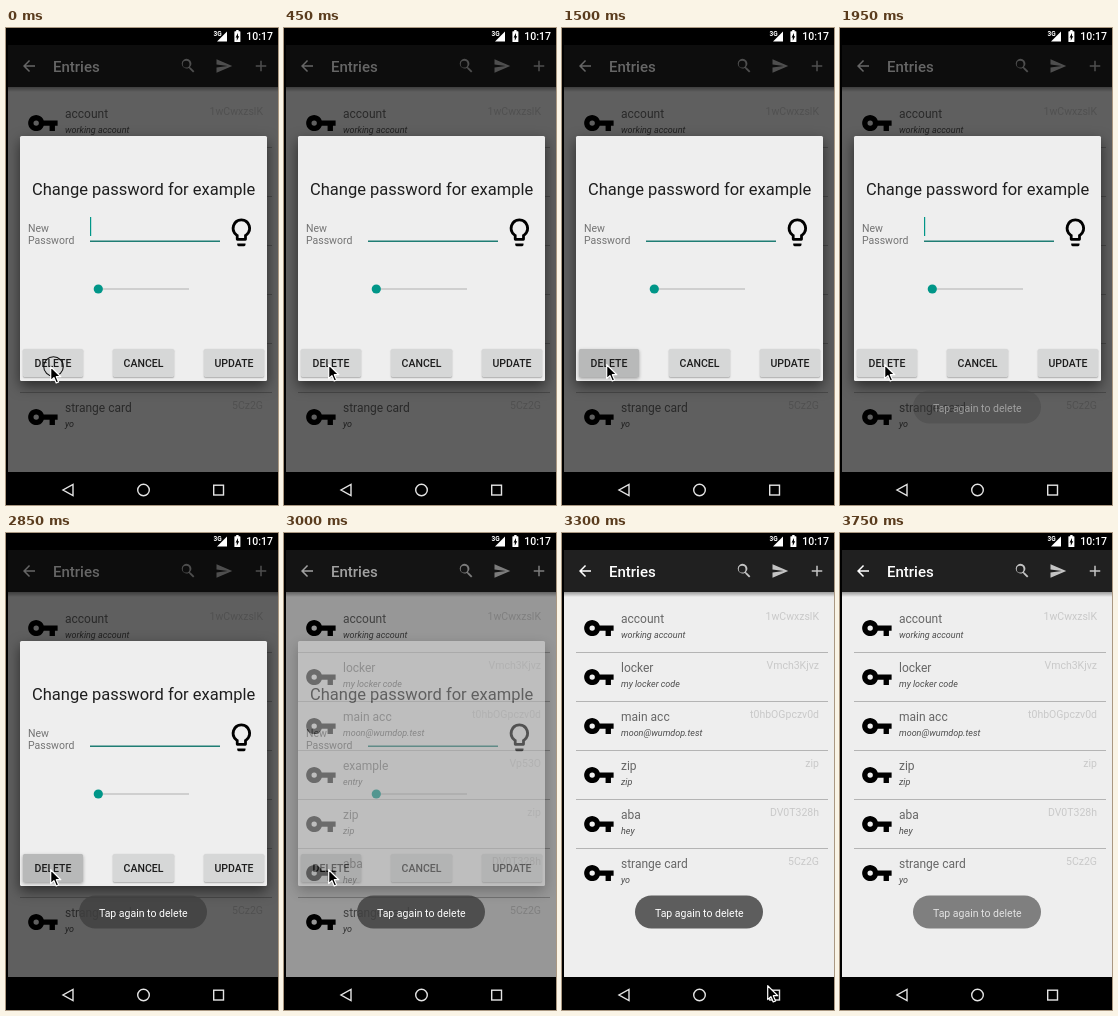
These frames come from a looping animation (272 px wide and 477 px high, 3960 ms). An HTML page with a canvas:

```html
<!DOCTYPE html>
<html lang="en">
<head>
<meta charset="utf-8">
<title>Password entries</title>
<style>
html, body { margin: 0; width: 100%; height: 100%; overflow: hidden; background: #000; }
canvas { display: block; width: 100vw; height: 100vh; }
</style>
</head>
<body>
<canvas id="stage"></canvas>
<script>
const W = 272, H = 477, LOOP = 3960;
const ratio = window.devicePixelRatio || 1;
const stage = document.getElementById('stage');
const layer = document.createElement('canvas');
for (const c of [stage, layer]) {
  c.width = W * ratio;
  c.height = H * ratio;
}
const screen = stage.getContext('2d');
const sheet = layer.getContext('2d');
for (const c of [screen, sheet]) c.scale(ratio, ratio);
let g = screen;

const TEAL = '#009688';
const ICONS = {
  back: 'M20 11H7.83l5.59-5.59L12 4l-8 8 8 8 1.41-1.41L7.83 13H20v-2z',
  search: 'M15.5 14h-.79l-.28-.27A6.5 6.5 0 1 0 13 14.7l.73.28v.79l5 4.99L20.49 19zM9.5 14a4.5 4.5 0 1 1 0-9 4.5 4.5 0 0 1 0 9z',
  send: 'M2.01 21L23 12 2.01 3 2 10l15 2-15 2z',
  add: 'M19 13h-6v6h-2v-6H5v-2h6V5h2v6h6v2z',
  key: 'M12.65 10A6 6 0 1 0 12.65 14H17v4h4v-4h2v-4zM7 14a2 2 0 1 1 0-4 2 2 0 0 1 0 4z',
  bulb: 'M9 21a1 1 0 0 0 1 1h4a1 1 0 0 0 1-1v-1H9zM12 2A7 7 0 0 0 8 14.74V17a1 1 0 0 0 1 1h6a1 1 0 0 0 1-1v-2.26A7 7 0 0 0 12 2zM14.85 13.1l-.85.6V16h-4v-2.3l-.85-.6A5 5 0 1 1 14.85 13.1z',
  battery: 'M16 4H14V2h-4v2H8a1 1 0 0 0-1 1v16a1 1 0 0 0 1 1h8a1 1 0 0 0 1-1V5a1 1 0 0 0-1-1zM11 20v-5.5H9L13 7v5.5h2z',
  pointer: 'M.7.7V14.6L3.9 11.6 6.2 17 8.6 16 6.3 10.7H10.8z'
};
for (const name in ICONS) ICONS[name] = new Path2D(ICONS[name]);

const ENTRIES = [
  ['account', 'working account', '1wCwxzslK'],
  ['locker', 'my locker code', 'Vmch3Kjvz'],
  ['main acc', 'moon@wumdop.test', 't0hbOGpczv0d'],
  ['example', 'entry', 'Vp53O'],
  ['zip', 'zip', 'zip'],
  ['aba', 'hey', 'DV0T328h'],
  ['strange card', 'yo', '5Cz2G']
];

// Stepped tracks: [start time, value]
const TRACKS = {
  caret: [[0, 1], [150, 0], [750, 1], [1200, 0], [1950, 1], [2400, 0]],
  ring: [[0, 1], [150, 0], [1200, 1], [1350, 0], [2400, 1], [2550, 0]],
  press: [[0, 0], [1350, .7], [1500, 1], [1650, 0], [2850, 1], [3000, .5]],
  toast: [[0, 0], [1800, .2], [1950, .45], [2100, .75], [2250, 1], [3750, .77]],
  dialog: [[0, 1], [3000, .45], [3150, .04], [3300, 0]],
  dim: [[0, .6], [3000, .37], [3150, .22], [3300, 0]],
  pointer: [[0, [44, 338]], [450, [44, 336]], [3300, [205, 452]], [3450, null]],
  removed: [[0, 0], [3300, 1]]
};

function stateAt(t) {
  const s = {};
  for (const name in TRACKS) {
    s[name] = TRACKS[name].filter(k => k[0] <= t).pop()[1];
  }
  return s;
}

function rect(x, y, w, h, fill) {
  g.fillStyle = fill;
  g.fillRect(x, y, w, h);
}

function pill(x, y, w, h, r, fill) {
  g.fillStyle = fill;
  g.beginPath();
  g.roundRect(x, y, w, h, r);
  g.fill();
}

function shadow(color, blur, dy) {
  g.shadowColor = color;
  g.shadowBlur = blur * ratio;
  g.shadowOffsetY = dy * ratio;
}

function text(str, x, y, size, fill, style = '', align = 'left') {
  g.font = `${style} ${size}px Roboto, sans-serif`;
  g.textAlign = align;
  g.fillStyle = fill;
  g.fillText(str, x, y);
}

function icon(name, x, y, scale, fill) {
  g.save();
  g.translate(x, y);
  g.scale(scale, scale);
  g.fillStyle = fill;
  g.fill(ICONS[name], 'evenodd');
  g.restore();
}

function circle(x, y, r) {
  g.beginPath();
  g.arc(x, y, r, 0, Math.PI * 2);
}

function drawList(removed) {
  rect(2, 17, 270, 427, '#eee');
  const rows = ENTRIES.filter(e => !removed || e[0] !== 'example');
  rows.forEach(([name, note, code], i) => {
    const y = 71 + i * 49;
    icon('key', 20.8, y + 8, 1.34, '#000');
    text(name, 59, y + 19, 12, '#666');
    text(note, 59, y + 34, 9, '#4c4c4c', 'italic');
    text(code, 257, y + 16, 10.5, '#c9c9c9', '', 'right');
    if (i < rows.length - 1) rect(14, y + 48, 252, 1, '#b4b4b4');
  });

  const fade = g.createLinearGradient(0, 59, 0, 64);
  fade.addColorStop(0, 'rgba(0,0,0,.35)');
  fade.addColorStop(1, 'rgba(0,0,0,0)');
  rect(2, 59, 270, 5, fade);
  rect(2, 17, 270, 42, '#202020');
  icon('back', 14, 29, .75, '#fff');
  text('Entries', 47, 44, 15, '#fff', '500');
  icon('search', 173, 29, .75, '#c4c4c4');
  icon('send', 209, 29, .75, '#c4c4c4');
  icon('add', 246, 29, .75, '#c4c4c4');
}

function drawBars() {
  rect(0, 0, W, 17, '#000');
  rect(0, 444, W, 33, '#000');
  rect(0, 0, 2, H, '#000');
  text('3G', 207.5, 7.5, 6.5, '#fff', '700');
  g.fillStyle = '#fff';
  g.beginPath();
  g.moveTo(211, 13.5);
  g.lineTo(221, 13.5);
  g.lineTo(221, 3.5);
  g.fill();
  icon('battery', 224.2, .8, .6, '#fff');
  text('10:17', 267, 12, 10.5, '#fff', '500', 'right');

  g.strokeStyle = '#e4e4e4';
  g.lineWidth = 1.4;
  g.beginPath();
  g.moveTo(67, 456.5);
  g.lineTo(67, 467.5);
  g.lineTo(57, 462);
  g.closePath();
  g.stroke();
  circle(137.5, 462, 5.8);
  g.stroke();
  g.strokeRect(207.7, 457.2, 9.8, 9.8);
}

function drawButton(label, x, w, press) {
  const tone = Math.round(214 - press * 30);
  g.save();
  shadow('rgba(0,0,0,.35)', 1.5 + press * 2, .8 + press * .7);
  pill(x, 321, w, 28, 1.5, `rgb(${tone},${tone + 1},${tone + 1})`);
  g.restore();
  text(label, x + w / 2, 339, 10.5, '#1c1c1c', '500', 'center');
}

function drawDialog(s) {
  g.save();
  shadow('rgba(0,0,0,.55)', 13, 5);
  pill(14, 108, 247, 245, 1.5, '#eee');
  g.restore();
  text('Change password for example', 26, 167, 16.5, '#1e1e1e');
  text('New', 22, 204, 10.5, '#747474');
  text('Password', 22, 216, 10.5, '#747474');
  rect(84, 212.5, 130, 1.5, '#1f7d74');
  if (s.caret) rect(84, 189, 1.2, 19, TEAL);
  icon('bulb', 218.8, 187.8, 1.38, '#000');
  rect(92, 260.5, 91, 1, '#b2b2b2');
  g.fillStyle = TEAL;
  circle(92.3, 261, 4.6);
  g.fill();
  drawButton('DELETE', 17, 60, s.press);
  drawButton('CANCEL', 107, 61, 0);
  drawButton('UPDATE', 198, 60, 0);
}

function drawToast(alpha) {
  g.save();
  g.globalAlpha = alpha * .83;
  pill(73, 362.5, 128, 33, 16.5, '#404040');
  g.globalAlpha = alpha;
  text('Tap again to delete', 137.3, 383.5, 10.5, '#fff', '', 'center');
  g.restore();
}

function drawPointer([x, y], ring) {
  if (ring) {
    g.strokeStyle = '#111';
    g.lineWidth = 1.1;
    circle(x + 3.5, y + .5, 9.8);
    g.stroke();
  }
  g.save();
  g.translate(x, y);
  g.lineJoin = 'round';
  g.lineWidth = 1.2;
  g.strokeStyle = '#fff';
  g.fillStyle = '#000';
  g.fill(ICONS.pointer);
  g.stroke(ICONS.pointer);
  g.restore();
}

function draw(t) {
  const s = stateAt(t);
  g = screen;
  g.clearRect(0, 0, W, H);
  drawList(s.removed);
  rect(2, 17, 270, 427, `rgba(0,0,0,${s.dim})`);
  if (s.dialog) {
    g = sheet;
    g.clearRect(0, 0, W, H);
    drawDialog(s);
    g = screen;
    g.globalAlpha = s.dialog;
    g.drawImage(layer, 0, 0, W, H);
    g.globalAlpha = 1;
  }
  if (s.toast) drawToast(s.toast);
  drawBars();
  if (s.pointer) drawPointer(s.pointer, s.ring);
}

function tick() {
  draw(performance.now() % LOOP);
  requestAnimationFrame(tick);
}
tick();
</script>
</body>
</html>
```
